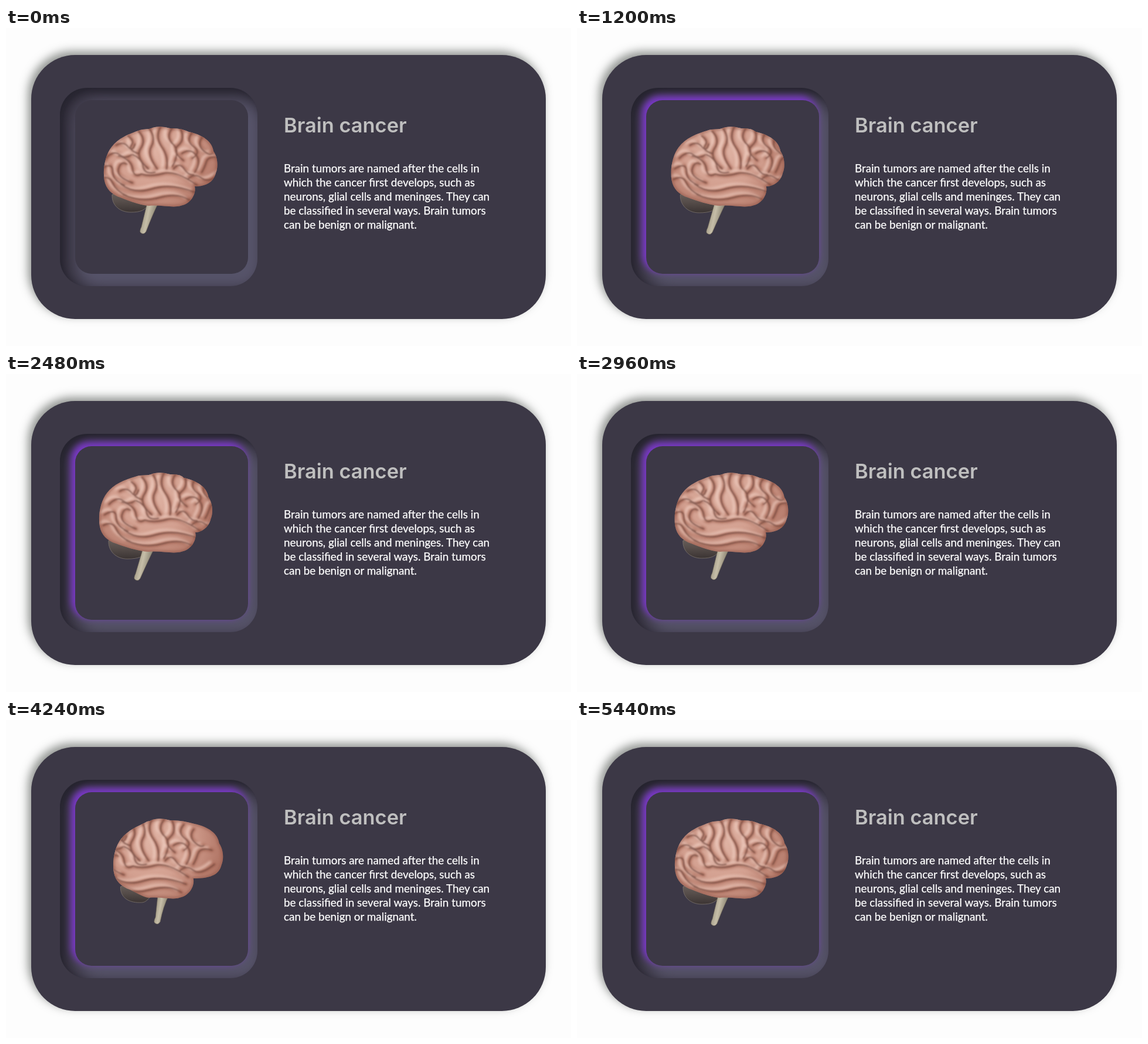
Write an HTML page that moves like this. It is 964x542 px and loops after 5.52 s.

```html
<!DOCTYPE html>
<html lang="en">
<head>
<meta charset="utf-8">
<title>Brain cancer</title>
<style>
  html, body { margin: 0; width: 100%; height: 100%; overflow: hidden; background: #fdfdfd; }
  div, svg { position: absolute; box-sizing: border-box; }
  #card { left: 43px; top: 46px; width: 878px; height: 450px; border-radius: 75px;
    background: #3c3846; box-shadow: -5px -6px 16px rgba(50, 55, 50, .55); }
  #frame { left: 92px; top: 102px; width: 337px; height: 338px; border-radius: 46px; overflow: hidden;
    background: #3c3846; box-shadow: inset 8px 8px 16px #25232e; }
  #well { left: 26px; top: 21px; width: 295px; height: 296px; border-radius: 28px; background: #3c3846; }
  svg { left: 0; top: 0; }
  .title { font: 600 34.4px Inter, sans-serif; fill: #bfbfbf; }
  .body { font: 18.88px Lato, sans-serif; fill: #fff; stroke: #fff; stroke-width: .25px; }
  #sulci path { fill: none; stroke-linecap: round; }
</style>
</head>
<body>
<div id="card"></div>
<div id="frame"><div id="well"></div></div>
<svg width="964" height="542" viewBox="0 0 964 542">
  <defs>
    <radialGradient id="flesh" gradientUnits="userSpaceOnUse" cx="248" cy="205" r="120">
      <stop offset="0" stop-color="#e0b4a5"/>
      <stop offset=".55" stop-color="#d3a090"/>
      <stop offset="1" stop-color="#b27767"/>
    </radialGradient>
    <linearGradient id="bone" x1="0" x2="1" y1="0" y2=".35">
      <stop offset="0" stop-color="#857d6c"/>
      <stop offset=".5" stop-color="#c6bea8"/>
      <stop offset="1" stop-color="#777060"/>
    </linearGradient>
    <linearGradient id="dusk" x1="0" x2="0" y1="0" y2="1">
      <stop offset="0" stop-color="#6d6560"/>
      <stop offset=".55" stop-color="#554c49"/>
      <stop offset="1" stop-color="#3b3433"/>
    </linearGradient>
    <filter id="soft" x="-10%" y="-10%" width="120%" height="120%"><feGaussianBlur stdDeviation="2.2"/></filter>
    <filter id="fine" x="-10%" y="-10%" width="120%" height="120%"><feGaussianBlur stdDeviation=".8"/></filter>
    <clipPath id="clip"><path class="cortex"/></clipPath>
    <g id="sulci"></g>
  </defs>
  <path id="cerebellum" fill="url(#dusk)" stroke="#7d746e" stroke-width=".8"/>
  <path id="stem" fill="url(#bone)" stroke="#6d6656" stroke-width=".6"/>
  <path class="cortex" fill="url(#flesh)"/>
  <g clip-path="url(#clip)">
    <g id="folds">
      <use href="#sulci" stroke="#a0604f" stroke-width="7" opacity=".65" filter="url(#soft)"/>
      <use href="#sulci" x="-7" y="-4" stroke="#f6d8cc" stroke-width="3.6" opacity=".75" filter="url(#soft)"/>
      <use href="#sulci" stroke="#70463c" stroke-width="2" opacity=".75" filter="url(#fine)"/>
    </g>
    <path class="cortex" fill="none" stroke="#8a5145" stroke-width="5" opacity=".55" filter="url(#soft)"/>
  </g>
  <text class="title" x="474" y="178">Brain cancer</text>
  <g id="copy" class="body"></g>
</svg>
<script>
const LOOP = 5520, STEP = 80;
const $ = id => document.getElementById(id);
const clamp = v => Math.min(1, Math.max(0, v));

const upperFolds = [
  'M264 168Q254 186 266 203T274 240', 'M245 172Q256 188 248 202T258 240',
  'M226 176Q240 190 230 205T243 240', 'M284 170Q272 186 285 198T284 236',
  'M298 172Q306 190 294 200T303 226', 'M318 178Q306 192 320 202T318 222',
  'M335 186Q326 198 336 208T352 214', 'M300 214Q314 204 324 216T322 246',
  'M286 240Q296 228 304 240T320 250', 'M366 222Q346 216 342 228T334 246',
  'M208 184Q220 192 214 200T226 214', 'M188 200Q200 192 208 202T220 198'
];
const lowerFolds = [
  'M231 249Q246 254 268 248T326 268', 'M196 266Q218 284 250 274T322 280',
  'M200 284Q230 298 262 289T314 294', 'M231 249Q218 256 216 240T192 218',
  'M170 222Q184 208 194 216T214 216', 'M206 232Q196 226 192 240T216 264',
  'M162 240Q182 228 182 244T202 268', 'M160 258Q176 250 182 264T206 286',
  'M310 258Q322 246 334 256T370 246', 'M216 216Q232 222 234 236T254 246'
];
$('sulci').innerHTML = [...upperFolds, ...lowerFolds].map(d => `<path d="${d}"/>`).join('');

$('copy').innerHTML = [
  'Brain tumors are named after the cells in',
  'which the cancer first develops, such as',
  'neurons, glial cells and meninges. They can',
  'be classified in several ways. Brain tumors',
  'can be benign or malignant.'
].map((line, i) => `<text x="474" y="${246 + 24 * i}">${line}</text>`).join('');

// Sideways shift of the stem tip while the brain swings once each way.
function swing(t) {
  const wave = -Math.sin(2 * Math.PI * clamp((t - 820) / 4310));
  return wave * (wave < 0 ? 15 : 25);
}

function drawBrain(p) {
  const l = p * (p < 0 ? .8 : .67), r = p * (p < 0 ? .87 : .4), tip = -.1 * p;
  const cortex = `M${167 + l} 250C${166 + l} 235 ${171 + l} 214 ${180 + l} 203
    C${191 + l} 188 ${211 + l} 180 ${226 + l * .7} 175C${236 + l * .5} 171 242 174 250 170
    Q264 166 280 171Q298 170 ${312 + r} 177C${336 + r} 182 ${352 + r} 194 ${354 + r} 210
    C${362 + r} 222 ${362 + r} 238 ${358 + r} 247C${354 + r} 264 ${339 + r} 270 ${322 + tip} 270
    C${325 + tip} 283 ${315 + tip} 300 ${298 + tip} 303C285 307 262 301 244 303
    C${226 + l * .4} 302 ${204 + l} 292 ${190 + l} 287C${175 + l} 280 ${167 + l} 268 ${167 + l} 250Z`;
  document.querySelectorAll('.cortex').forEach(e => e.setAttribute('d', cortex));

  const c = p * .6, y = -.12 * p;
  $('cerebellum').setAttribute('d', `M${181 + c} 284C${180 + c} 302 ${194 + c} ${314 + y} ${213 + c} ${314 + y}
    C${229 + c * .5} ${314 + y} 238 311 ${244 + c * .3} 299L${205 + c} 276Z`);

  const top = p * .75;
  $('stem').setAttribute('d', `M${241 + top} 298L${260 + top} 298Q${250 + top} 318 ${239 + p} ${347 + y}
    Q${235 + p} ${353 + y} ${230 + p} ${349 + y}Q${227 + p} ${347 + y} ${231 + p} ${339 + y}Z`);
  $('folds').setAttribute('transform', `translate(${-.6 * p} 0)`);
}

function render(time) {
  const t = Math.floor(time % LOOP / STEP) * STEP;
  const glow = clamp(t / 640);
  $('well').style.boxShadow =
    `-5px -5px 12px 2px rgba(122, 56, 200, ${glow}), 13px 13px 22px 10px #57546a`;
  drawBrain(swing(t));
}

const start = performance.now();
function tick() {
  render(performance.now() - start);
  requestAnimationFrame(tick);
}
tick();
</script>
</body>
</html>
```
